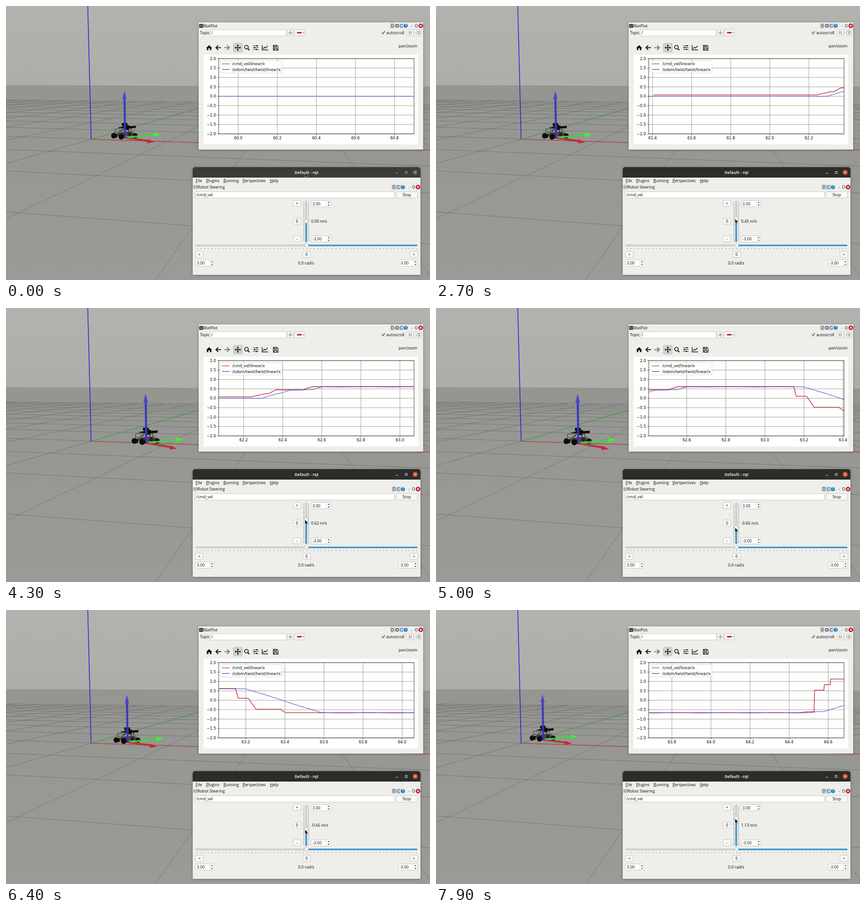
An HTML page for the animation above (8 s loop, 931 px wide and 602 px high).

```html
<!DOCTYPE html>
<html lang="en">
<head>
<meta charset="utf-8">
<title>Robot steering</title>
<style>
html, body { margin: 0; width: 100%; height: 100%; overflow: hidden; background: #989895; }
svg { display: block; width: 931px; height: 602px; }
text { font: 500 8.7px "Open Sans", "Noto Sans", sans-serif; fill: #080808; white-space: pre; }
.plot text { font: 8.33px "DejaVu Sans", sans-serif; fill: #080808; }
.title { font-weight: 700; fill: #e4e3df; }
.mid { text-anchor: middle; }
.end { text-anchor: end; }
.u { text-decoration: underline; }
.window { filter: drop-shadow(0 1px 2.5px rgba(0, 0, 0, .35)); }
</style>
</head>
<body>
<svg id="stage" viewBox="0 0 931 602" xmlns="http://www.w3.org/2000/svg"></svg>
<script>
const LOOP = 8000, STEP = 100, GRAB = 1400;
const RED = '#bf1535', BLUE = '#2a20cc', GRID = '#888886';
const PLOT = { x: 467, y: 115.7, w: 429, h: 165.3 };
const plotY = v => PLOT.y + PLOT.h * (2 - v) / 4;

// Slider drag: time reached, speed, length of the ramp towards it
const FIRST = { time: 61.405, speed: .07 };
const MOVES = [[62.31, .24, .074], [62.364, .45, .036], [62.553, .62, .049], [63.16, .11, .012], [63.252, -.48, .039],
  [63.403, -.66, .025], [64.49, -.61, .038], [64.529, .54, 0], [64.58, .83, 0], [64.611, 1.13, 0]];

function command(t) {
  let v = FIRST.speed;
  for (const [end, speed, ramp] of MOVES) {
    if (t < end) return t > end - ramp ? speed + (v - speed) * (end - t) / ramp : v;
    v = speed;
  }
  return v;
}

// The wheels follow the command late and with limited acceleration
const DT = .0025, DELAY = .05, ACCEL = 3.3;
const odom = [];
for (let k = 0, v = 0; k < 1600; k++) {
  const wanted = command(61 + k * DT - DELAY), goal = Math.abs(wanted) < .1 ? 0 : wanted;
  v += Math.max(-ACCEL * DT, Math.min(ACCEL * DT, goal - v));
  odom.push(v && v + .009 * Math.sin(k / 16));
}
const measured = t => odom[Math.round((t - 61) / DT)] || 0;

function clock(ms) {
  if (ms < GRAB) return 60.9 + .000425 * Math.min(ms, 1200);
  const keys = [[1500, 61.84], [2700, 62.38], [3700, 62.787], [5000, 63.405], [6400, 64.061], [7900, 64.681]];
  const i = Math.max(1, keys.findIndex(k => k[0] >= ms));
  const [a, b] = [keys[i - 1], keys[i]];
  return a[1] + (b[1] - a[1]) * progress(ms, a[0], b[0]);
}

const progress = (ms, from, to) => Math.min(1, Math.max(0, (ms - from) / (to - from)));
const swing = p => (1 - Math.cos(Math.PI * p)) / 2;
const drive = ms => 52 * swing(progress(ms, 2400, 4800)) - 78 * swing(progress(ms, 4800, 7650));

function pointer(ms) {
  const down = progress(ms, 0, 900), across = progress(ms, 900, 1200);
  return [656 + 14 * down + 19 * across, 367 + 106 * down - 7 * across];
}

const rect = (x, y, w, h, fill, extra = '') => `<rect x="${x}" y="${y}" width="${w}" height="${h}" fill="${fill}" ${extra}/>`;
const disc = (x, y, r, fill, extra = '') => `<circle cx="${x}" cy="${y}" r="${r}" fill="${fill}" ${extra}/>`;
const line = (x1, y1, x2, y2, color, w = 1, extra = '') =>
  `<line x1="${x1}" y1="${y1}" x2="${x2}" y2="${y2}" stroke="${color}" stroke-width="${w}" ${extra}/>`;
const fill = (d, color, extra = '') => `<path d="${d}" fill="${color}" ${extra}/>`;
const draw = (d, color, w = 1, extra = '') => `<path d="${d}" fill="none" stroke="${color}" stroke-width="${w}" ${extra}/>`;
const text = (x, y, s, cls = '', extra = '') => `<text x="${x}" y="${y}" class="${cls}" ${extra}>${s}</text>`;
const field = (x, y, w, h) => rect(x, y, w, h, '#fff', 'rx="2" stroke="#b9b8b4" stroke-width=".8"');
const knob = (x, y, id = '') => rect(x - 3.7, y - 3.7, 7.4, 7.4, '#fbfbfa', `rx="1.8" stroke="#b2b2ae" stroke-width=".8" ${id}`);
const groove = (x, y, w, h) => rect(x, y, w, h, '#d2d2ce', 'rx="1.5" stroke="#b5b5b1" stroke-width=".5"');
const button = (x, y, w, h, label = '') =>
  rect(x, y, w, h, '#f8f8f6', 'rx="1.5" stroke="#b9b8b4" stroke-width=".8"') +
  text(x + w / 2, y + h / 2 + 3.2, label, 'mid');

function spin(x, y, w, label) {
  const r = x + w - 4.5;
  return field(x, y, w, 13.5) + line(x + w - 9, y, x + w - 9, y + 13.5, '#d2d1cd', .7) +
    text(x + 3, y + 10, label) +
    fill(`M${r - 2.2} ${y + 5}h4.4l-2.2-2.7zM${r - 2.2} ${y + 8.7}h4.4l-2.2 2.7z`, '#444');
}

// Two families of floor lines, one per vanishing point on the line y = h
function ground() {
  const h = 165, grey = '#62625f';
  let s = rect(0, 0, 931, 602, 'url(#sky)') + fill('M0 174L931 177V602H0Z', 'url(#floor)');
  for (let i = -10; i <= 10; i++) {
    const k = -3.483 + 1.394 * i, far = 4444 / (92.06 - k);
    s += line(632 + k * far, h + far, 632 + k * 437, 602, grey, .6);
    const inv = .00825 + .00159 * i;
    if (inv > 0) s += line(0, h + 1 / inv, 931, h + 1.2442 / inv, grey, .6);
  }
  return s + line(187, 293, 931, 317, '#d22a38', .9) + line(187, 293, 632, 163, '#25b62a', .9) +
    line(187, 293, 179.5, 0, '#1c1cd2', 1.5);
}

function robot() {
  const ink = '#0c0c0c';
  const wheel = (x, y, rx, ry) => `<ellipse cx="${x}" cy="${y}" rx="${rx}" ry="${ry}" fill="${ink}"/>`;
  return wheel(272, 282, 4, 4.5) +
    fill('M243 280L262 276L283 279L281 285L256 287L244 285Z', '#2b2b2a', 'opacity=".75"') +
    draw('M239 270V284M250 272V284M239 270L262 269L276 272M240 277L258 279L281 276M275 269V281M246 267L258 268', '#333331', 1) +
    wheel(236.5, 285, 5.7, 6) + wheel(242, 285, 2.5, 4.5) + wheel(253, 287, 6, 6.3) + wheel(259, 286, 3, 4.6) + wheel(284, 285, 5.4, 5.6) +
    fill('M255 257H266L267 262H271V264L285 263V268L271 269L268 272H259L258 268H252V265H257L254 261Z', ink) +
    draw('M247 267H254M252 276L257 271M268 271L270 277', ink, 1.4) +
    '<g id="nose">' + draw('M261 289L313 296.5', '#bd2430', 4.2, 'opacity=".85"') +
    fill('M311 292.5L326 299L310 301.5Z', '#d2222f') + '</g>' +
    draw('M268 288.3L327 283', '#3bd83b', 4, 'opacity=".9"') +
    fill('M324 277.5L340 281.5L325 287.5Z', '#40ee3c') +
    draw('M261.5 289L260.2 203', '#4a48cc', 5, 'opacity=".85"') +
    draw('M261.5 289L260.2 204', '#2320a8', 1.4) +
    fill('M255.3 204.5L260 186.5L264.7 204.5Z', '#4a46d0');
}

function dockIcons(x, y, gear) {
  let s = rect(x - 4.5, y - 5, 9, 10, '#d9d9d6', 'rx="1.5" stroke="#999" stroke-width=".6"') + text(x, y + 3.2, 'D', 'mid');
  let p = x + 10;
  if (gear) {
    s += disc(p, y, 3.3, '#aaa', 'stroke="#555" stroke-width="1.6"') + disc(p, y, 1.2, '#eee');
    p += 9.5;
  }
  s += rect(p - 4, y - 4.5, 8, 9, '#d5e0ea', 'stroke="#8aa" stroke-width=".6"') +
    draw(`M${p + 2.5} ${y - 2}a3 3 0 1 0 .4 3.4`, '#3a78b4', 1.4);
  p += 9.5;
  s += disc(p, y, 4.6, '#2f7fc0') + text(p, y + 3, '?', 'mid', 'style="fill:#fff"');
  p += 14;
  return s + text(p, y + 3.2, '-', 'mid') + text(p + 9.5, y + 3.2, 'O', 'mid') + disc(p + 19.2, y, 5, '#c4122f') +
    draw(`M${p + 17.2} ${y - 2}l4 4m0-4l-4 4`, '#fff', 1.3);
}

function toolbar() {
  const k = '#151515';
  return fill('M439.5 92L446 86L452.5 92H451V97H447.7V93H444.3V97H441V92Z', k) +
    draw('M472 91.5H461.5M466 86.5L461 91.5L466 96.5', k, 2) +
    draw('M479.5 91.5H490M485.5 86.5L490.5 91.5L485.5 96.5', '#777', 2) +
    rect(499.5, 82, 19, 19, '#d3d3d0', 'rx="2" stroke="#aaa" stroke-width=".8"') +
    draw('M509 86V97M503.5 91.5H514.5', k, 1.5) +
    fill('M509 84.5l2.5 3h-5zM509 98.5l2.5-3h-5zM502 91.5l3-2.5v5zM516 91.5l-3-2.5v5z', k) +
    disc(528, 90.5, 4, 'none', `stroke="${k}" stroke-width="1.7"`) + draw('M531 93.5L534.5 97', k, 2.2) +
    draw('M542.5 87.5h12m-12 4h12m-12 4h12', k, 1.2) +
    rect(550, 86, 2, 3, k) + rect(545, 90, 2, 3, k) + rect(549, 94, 2, 3, k) +
    draw('M562.5 86V96.5H575.5M564.5 94L567.5 90.5L570 92.5L574.5 87.5', k, 1.5) +
    draw('M587 86.5H595L597.5 89V97H587ZM589 87V90H594V87M589 97V93H595V97', k, 1.3);
}

function plotWindow() {
  let s = rect(423, 36, 493, 279.5, '#eeeeeb', 'class="window"') +
    rect(424, 39.5, 9, 8.5, '#3d3d42', 'rx="1.5"') + draw('M425 44.5l2-2 2 3 1.500-2h2', '#ddd', .8) +
    text(433, 47, 'MatPlot') + dockIcons(848.5, 43.5, true) +
    text(426, 62, 'Topic') + field(448.5, 52, 167, 14) + text(451, 62, '/') +
    button(618, 52, 13, 13.5) + draw('M624.5 54.5V63M620.3 58.8H628.7', '#b2b2af', 2.8) +
    button(633.5, 52, 22, 13.5) + rect(639, 57, 10, 3.4, '#c8233c') + fill('M651 58h3l-1.5 2z', '#444') +
    field(824.5, 55, 7.5, 7.5) + draw('M826 58.5L828 60.8L831.5 55.5', '#222', 1.3) +
    text(835, 62, 'autoscroll') + button(880, 52, 14.5, 13.5) + button(897, 52, 15, 13.5) +
    rect(884.5, 55, 2, 7.5, '#9a9a97') + rect(888.5, 55, 2, 7.5, '#9a9a97') +
    draw('M900 58.8L903 55.5H909V62H903ZM904.5 57.5l2.7 2.7m0-2.7l-2.7 2.7', '#555', .8) +
    toolbar() + text(862, 90.5, 'pan/zoom') + rect(434, 107, 471, 197, '#fefefc') + '<g class="plot"><g id="xgrid"></g>';
  for (let v = 2; v >= -2; v -= .5) {
    const y = plotY(v);
    s += line(467, y, 896, y, GRID, .8) + line(464, y, 467, y, '#111', .7) +
      text(461, y + 3, (v < 0 ? '\u2212' : '') + Math.abs(v).toFixed(1), 'end');
  }
  s += '<g clip-path="url(#axes)">' + draw('', RED, 1.3, 'id="command"') + draw('', BLUE, 1, 'id="odom"') + '</g>' +
    rect(PLOT.x, PLOT.y, PLOT.w, PLOT.h, 'none', 'stroke="#111" stroke-width=".8"') +
    rect(470.5, 120, 135.5, 27, '#fff', 'rx="1.5" fill-opacity=".85" stroke="#ccc" stroke-width=".8"');
  [[RED, '/cmd_vel/linear/x'], [BLUE, '/odom/twist/twist/linear/x']].forEach(([color, name], i) => {
    const y = 127.2 + 12.3 * i;
    s += line(474, y, 491, y, color, 1.1) + text(497, y + 3, name);
  });
  return s + '</g>';
}

function steeringWindow() {
  const menu = [[416.5, 'File'], [439.5, 'Plugins'], [477.5, 'Running'], [519.5, 'Perspectives'], [579.5, 'Help']];
  let s = rect(410, 354, 500, 236.5, '#eeeeeb', 'rx="4" class="window"') + rect(410, 374, 500, 216.5, '#eeeeeb') +
    fill('M410 377V359q0-5 5-5H905q5 0 5 5V377Z', '', 'id="bar"') +
    text(660, 369, 'Default - rqt', 'title mid') +
    draw('M855.8 367.5H860.5M876.5 363.5h4.5v4.5h-4.5z', '', 1, 'id="winButtons"') +
    disc(898.5, 365.5, 5.4, '', 'id="close"') + draw('M896.4 363.4l4.2 4.2m0-4.2l-4.2 4.2', '#f0efeb', 1);
  for (const [x, name] of menu) s += text(x, 386.5, `<tspan class="u">${name[0]}</tspan>${name.slice(1)}`);
  s += rect(411.5, 394, 8.5, 7.5, '#d8d8d5', 'rx="1" stroke="#777" stroke-width=".6"') +
    draw('M413 398h2.5m-1.2-1.2v2.4', '#333', .9) + disc(418, 397, 1, '#c22') +
    text(420.5, 401, 'Robot Steering') + dockIcons(852, 398, false) +
    field(415.5, 408, 437.5, 14) + text(418, 418, '/cmd_vel') + button(856.5, 408, 47, 14, 'Stop');
  ['+', '0', '-'].forEach((sign, i) => s += button(630.5, 427 + 38.8 * i, 17, 13.5, sign));
  ['&lt;', '0', '&gt;'].forEach((sign, i) => s += button(416 + 235.6 * i, 539, 17, 13.5, sign));
  return s + spin(670, 427.5, 43, '3.00') + spin(670, 505, 43, '-3.00') +
    draw('M654 430.5V518M664.3 430.5V518', '#8b8b87', 2, 'stroke-dasharray=".8 1.4"') +
    groove(657.3, 427.5, 3.6, 91) + rect(657.3, 473, 3.6, 45.5, '#3f97cf', 'rx="1.2" id="level"') +
    knob(659, 0, 'id="knob"') + text(670, 475.6, '', '', 'id="speed"') +
    groove(416, 524.3, 244, 3.4) + rect(660, 524.3, 243.5, 3.4, '#3f97cf', 'rx="1.5"') + knob(660, 525.7) +
    draw('M419.5 533H901.5', '#666662', 1.8, 'stroke-dasharray=".9 7.12"') +
    spin(416, 558, 40.5, '3.00') + spin(861, 558, 42.5, '-3.00') + text(659, 568, '0.0 rad/s', 'mid') +
    line(656, 579, 663, 579, '#d2d2ce', 1, 'stroke-dasharray="1 1"');
}

const $ = id => document.getElementById(id);
const set = (id, attrs) => Object.entries(attrs).forEach(([name, value]) => $(id).setAttribute(name, value));

$('stage').innerHTML = `<defs>
  <linearGradient id="sky" x1="0" y1="0" x2="0" y2=".29"><stop stop-color="#b2b2ae"/><stop offset="1" stop-color="#adada9"/></linearGradient>
  <linearGradient id="floor" x1="0" y1="0" x2="0" y2="1"><stop stop-color="#959591"/><stop offset="1" stop-color="#9a9a96"/></linearGradient>
  <clipPath id="axes">${rect(PLOT.x, PLOT.y, PLOT.w, PLOT.h, '#000')}</clipPath></defs>` +
  ground() + `<g id="robot">${robot()}</g>` + plotWindow() + steeringWindow() +
  fill('M0 0V10.2L2.4 8L4 11.5L5.7 10.7L4.2 7.4H7.3Z', '#161616', 'stroke="#eee" stroke-width=".6" id="pointer"');

function curve(speed, now, since = 0) {
  const points = [];
  for (let k = Math.ceil(Math.max(now - 1, since) / DT); k * DT <= now; k++)
    points.push((PLOT.x + (k * DT - now + 1) * PLOT.w).toFixed(2) + ' ' + plotY(speed(k * DT)).toFixed(2));
  return points.length ? 'M' + points.join('L') : '';
}

function render(ms) {
  const now = clock(ms), active = ms >= GRAB;

  let grid = '';
  for (let i = Math.ceil((now - 1) * 5); i <= now * 5; i++) {
    const x = PLOT.x + (i / 5 - now + 1) * PLOT.w;
    grid += line(x, PLOT.y, x, 281, GRID, .8) + line(x, 281, x, 284, '#111', .7) + text(x, 293.3, (i / 5).toFixed(1), 'mid');
  }
  $('xgrid').innerHTML = grid;
  set('command', { d: curve(command, now, FIRST.time) });
  set('odom', { d: curve(measured, now) });

  const dx = drive(ms);
  set('robot', { transform: `translate(${261 + dx} ${289 + .155 * dx}) scale(${1 + .00115 * dx}) translate(-261 -289)` });
  set('nose', { transform: `rotate(${.04 * dx} 261 289)` });

  const last = MOVES.filter(m => m[0] <= now + .003).pop();
  const value = !active ? 0 : last ? last[1] : FIRST.speed;
  const y = 473 - 13.5 * value;
  $('speed').textContent = value.toFixed(2) + ' m/s';
  set('knob', { transform: `translate(0 ${y})` });
  set('level', { y, height: 518.5 - y });
  set('pointer', { transform: `translate(${active ? [656.5, y + .5] : pointer(ms)})` });

  set('bar', { fill: active ? '#2c2c2a' : '#3c3b39' });
  set('close', { fill: active ? '#e2552c' : '#5b5a56' });
  set('winButtons', { stroke: active ? '#e8e7e3' : '#aaa9a5' });
}

const began = performance.now();
let shown = -1;
function tick() {
  const ms = Math.floor((performance.now() - began) % LOOP / STEP) * STEP;
  if (ms !== shown) render(shown = ms);
  requestAnimationFrame(tick);
}
tick();
</script>
</body>
</html>
```
